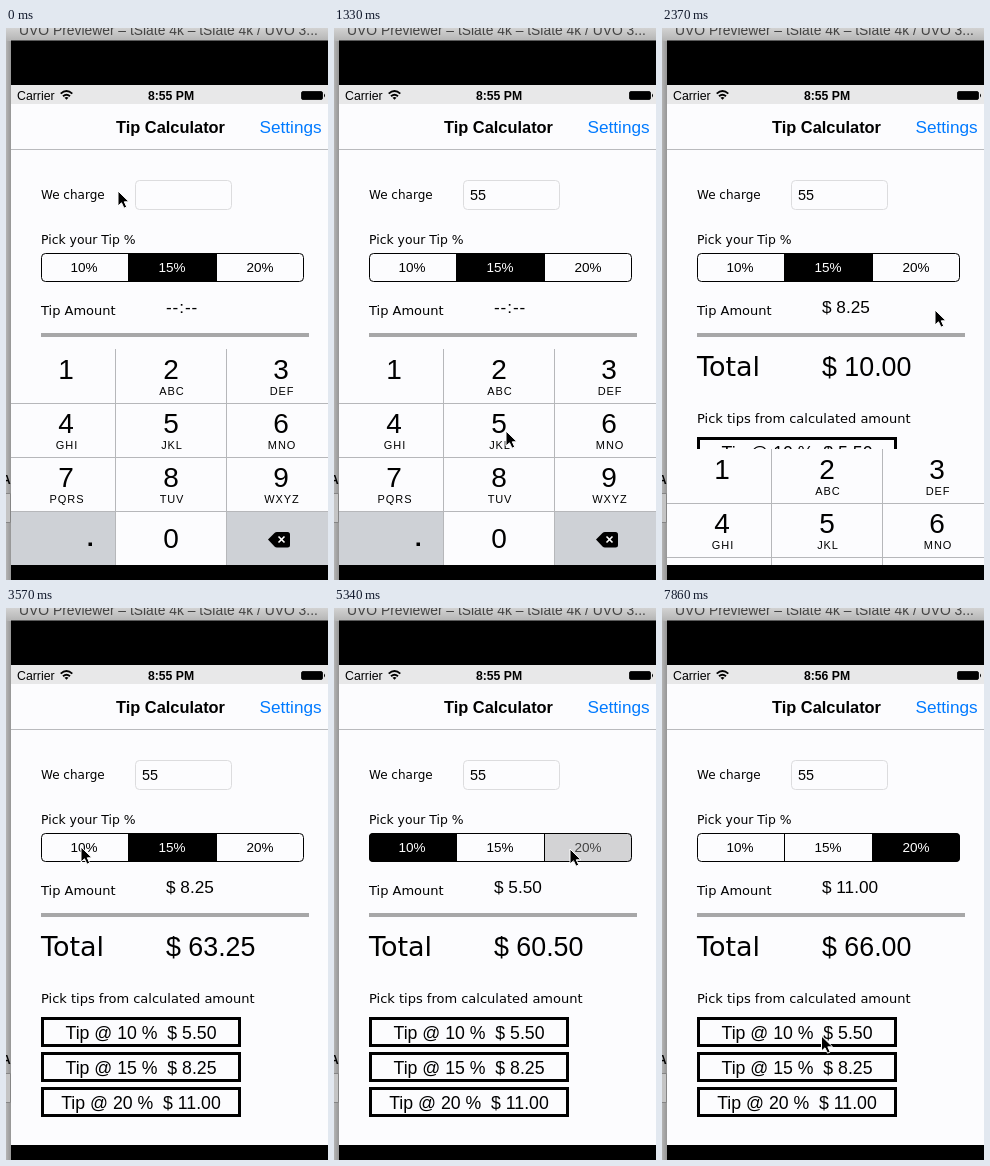
An HTML page that plays this animation: 322x552 px, repeating every 8 s.

```html
<!DOCTYPE html>
<html lang="en">
<head>
<meta charset="utf-8">
<title>Tip Calculator</title>
<style>
  html, body { margin: 0; width: 100%; height: 100%; overflow: hidden; background: #000; }
  svg { display: block; width: 100vw; height: 100vh; }
  text { font-family: "Liberation Sans", Arial, sans-serif; fill: #000; white-space: pre; }
  .label { font-family: "DejaVu Sans", Verdana, sans-serif; }
  .mid { text-anchor: middle; }
  .bold { font-weight: bold; }
  .digit { font-size: 28px; }
  .letters { font-size: 11px; letter-spacing: .9px; }
  .line { stroke: #b6b7ba; fill: none; }
</style>
</head>
<body>
<svg id="stage" viewBox="0 0 322 552" xmlns="http://www.w3.org/2000/svg">
  <defs>
    <linearGradient id="bar" x2="0" y2="1"><stop stop-color="#d2d2d2"/><stop offset="1" stop-color="#b4b4b4"/></linearGradient>
    <linearGradient id="shade"><stop stop-color="#b4b4b4"/><stop offset="1" stop-color="#969696"/></linearGradient>
    <clipPath id="screen"><rect x="5" y="57" width="317" height="480"/></clipPath>
    <clipPath id="segClip"><rect x="35" y="225" width="263" height="29" rx="4"/></clipPath>
    <clipPath id="totalClip"><rect x="30" y="327" width="90" height="21.4"/></clipPath>
  </defs>

  <!-- Desktop and window frame -->
  <rect width="5" height="552" fill="url(#shade)"/>
  <text x="-3" y="194" font-size="10">›</text>
  <text x="-4" y="456" font-size="12" class="bold">A</text>
  <path d="M0 465.5H4.5V494.5H0" fill="#c4c4c4" stroke="#858585"/>
  <rect width="322" height="13" fill="url(#bar)"/>
  <text x="13" y="7" font-size="13.87" style="fill:#444">UVO Previewer – tSlate 4k – tSlate 4k / UVO 3...</text>
  <rect x="5" y="12.5" width="317" height="540"/>

  <g clip-path="url(#screen)">
    <rect x="5" y="57" width="317" height="480" fill="#fcfcfe"/>
    <rect x="5" y="57" width="317" height="19" fill="#e8e8e9"/>
    <text x="11" y="71.5" font-size="12.3">Carrier</text>
    <g fill="none" stroke="#000" stroke-width="1.9">
      <path d="M54.7 65.6Q60.5 60.6 66.3 65.6M57 68.2Q60.5 65.2 64 68.2"/>
      <path d="M60.5 71.8L58.5 69.8Q60.5 68.2 62.5 69.8Z" fill="#000" stroke="none"/>
    </g>
    <text id="clock" x="142" y="71.5" font-size="12.2" class="bold"></text>
    <rect x="295.5" y="63.5" width="21" height="8" rx="1.5" stroke="#000" stroke-width=".8"/>
    <path d="M318 65.5Q320 67.5 318 69.5Z"/>

    <text x="110" y="105" font-size="16.4" class="bold">Tip Calculator</text>
    <text x="253.5" y="105" font-size="17.2" style="fill:#007aff">Settings</text>
    <path d="M5 121.5H322" stroke="#b9babd"/>

    <text x="35" y="171" font-size="12" class="label">We charge</text>
    <rect x="129.5" y="152.500" width="96" height="29" rx="4" fill="#fcfcfe" stroke="#dcdcde"/>
    <text id="charge" x="136" y="172" font-size="14.4"></text>

    <text x="35" y="216" font-size="12.4" class="label">Pick your Tip %</text>
    <g id="segments" clip-path="url(#segClip)"></g>
    <rect x="35.5" y="225.5" width="262" height="28" rx="4" fill="none" stroke="#000"/>

    <text x="35" y="287" font-size="13" class="label">Tip Amount</text>
    <text id="tip" x="160" y="285" font-size="17.2"></text>
    <rect x="35" y="305" width="268" height="4" fill="#a7a7a8"/>
    <text x="35" y="348" font-size="27" class="label" clip-path="url(#totalClip)">Total</text>
    <text id="total" x="160" y="348" font-size="26.8"></text>

    <text x="35" y="395" font-size="13" class="label">Pick tips from calculated amount</text>
    <g id="choices"></g>
    <g id="keyboard"></g>
  </g>

  <path id="cursor" d="M0 0V15L3.500 11.800L6 17.200L8.700 16L6.300 10.800H11Z" stroke="#fff" stroke-width="1" stroke-linejoin="round"/>
</svg>

<script>
const LOOP = 8000, STEPS = 54;
const $ = id => document.getElementById(id);

function add(parent, tag, attrs, content = '') {
  const node = document.createElementNS('http://www.w3.org/2000/svg', tag);
  for (const name in attrs) node.setAttribute(name, attrs[name]);
  node.textContent = content;
  return parent.appendChild(node);
}

const money = value => '$ ' + value.toFixed(2);
const rates = [10, 15, 20];
const bill = 55;

const segments = rates.map((rate, i) => {
  const x = [35, 122, 210][i], width = [87, 88, 88][i];
  const box = add($('segments'), 'rect', { x, y: 225, width, height: 29 });
  const label = add($('segments'), 'text', { x: 78 + 88 * i, y: 244, class: 'mid', 'font-size': 13.5 }, rate + '%');
  if (i) add($('segments'), 'path', { d: `M${x + .5} 225V254`, stroke: '#000' });
  return { box, label };
});

rates.forEach((rate, i) => {
  const y = 409 + 35 * i;
  add($('choices'), 'rect', { x: 36.5, y: y + 1.5, width: 197, height: 27, fill: 'none', stroke: '#000', 'stroke-width': 3 });
  add($('choices'), 'text', { x: 135, y: y + 22, class: 'mid', 'font-size': 17.7 },
    `Tip @ ${rate} %\u00a0 ${money(bill * rate / 100)}`);
});

const keys = [];
function buildKeyboard() {
  const pad = $('keyboard'), edges = [5, 109, 220, 322], centers = [60, 165, 275];
  const letters = ['', 'ABC', 'DEF', 'GHI', 'JKL', 'MNO', 'PQRS', 'TUV', 'WXYZ'];
  for (let i = 0; i < 12; i++) {
    const col = i % 3, y = 321 + 54 * Math.floor(i / 3);
    const fill = i === 9 || i === 11 ? '#ced1d6' : '#fcfcfe';
    keys.push(add(pad, 'rect', { x: edges[col], y, width: edges[col + 1] - edges[col], height: 54, fill }));
    const digit = i < 9 ? i + 1 : i === 10 ? 0 : '';
    add(pad, 'text', { x: centers[col], y: y + (i < 9 ? 30 : 37), class: 'digit mid' }, digit);
    add(pad, 'text', { x: centers[col] + 1, y: y + 46, class: 'letters mid' }, letters[i]);
  }
  add(pad, 'path', { class: 'line', d: 'M5 375.500H322M5 429.500H322M5 483.500H322M109.500 321V537M220.500 321V537' });
  add(pad, 'rect', { x: 82.5, y: 514.5, width: 3.5, height: 3.5 });
  add(pad, 'path', { d: 'M262 511.500L268.500 505Q269.500 504 271 504H281.500Q284 504 284 506.500V517Q284 519.500 281.500 519.500H271Q269.500 519.500 268.500 518.500Z' });
  add(pad, 'path', { d: 'M272.500 508.500L278.500 514.500M278.500 508.500L272.500 514.500', stroke: '#fff', 'stroke-width': 1.6 });
}
buildKeyboard();

// Pointer path: step, x, y
const path = [
  [0, 112, 163], [1, 115, 178], [3, 148, 310], [5, 171, 400], [6, 172, 403], [9, 172, 403],
  [10, 182, 391], [12, 240, 318], [14, 273, 282], [22, 273, 282], [24, 75, 239],
  [31, 75, 239], [32, 160, 247], [33, 227, 243], [34, 227, 243], [35, 236, 241],
  [39, 236, 241], [41, 212, 360], [43, 178, 460], [44, 170, 438], [45, 166, 427],
  [52, 166, 427], [53, 159.5, 428]
];

function pointerAt(step) {
  const next = path.findIndex(p => p[0] >= step);
  const b = path[next], a = path[Math.max(0, next - 1)];
  const f = b[0] === a[0] ? 0 : (step - a[0]) / (b[0] - a[0]);
  return [a[1] + (b[1] - a[1]) * f, a[2] + (b[2] - a[2]) * f];
}

function render(step) {
  const chosen = step < 27 ? 1 : step < 37 ? 0 : 2;
  const pressed = step === 26 ? 0 : step === 36 ? 2 : -1;
  const tip = bill * rates[chosen] / 100;

  segments.forEach(({ box, label }, i) => {
    box.setAttribute('fill', i === chosen ? '#000' : i === pressed ? '#d3d3d5' : '#fcfcfe');
    label.style.fill = i === chosen ? '#fff' : i === pressed ? '#444' : '#000';
  });
  $('clock').textContent = step < 51 ? '8:55 PM' : '8:56 PM';
  $('charge').textContent = step < 7 ? '' : step < 9 ? '5' : '55';
  $('tip').textContent = step < 16 ? '--:--' : money(tip);
  $('tip').setAttribute('letter-spacing', step < 16 ? .9 : 0);
  $('total').textContent = money(step < 17 ? 10 : bill + tip);

  keys[4].setAttribute('fill', step === 6 || step === 8 ? '#ced1d6' : '#fcfcfe');
  const slide = step < 16 ? 0 : step === 16 ? 100 : step === 17 ? 195 : 217;
  $('keyboard').setAttribute('transform', `translate(0 ${slide})`);
  $('cursor').setAttribute('transform', `translate(${pointerAt(step)})`);
}

const start = performance.now();
function tick() {
  const time = (performance.now() - start) % LOOP;
  // Slight lead absorbs the rounding of step lengths
  render(Math.min(STEPS - 1, Math.floor((time + 8) * STEPS / LOOP)));
  requestAnimationFrame(tick);
}
tick();
</script>
</body>
</html>
```
